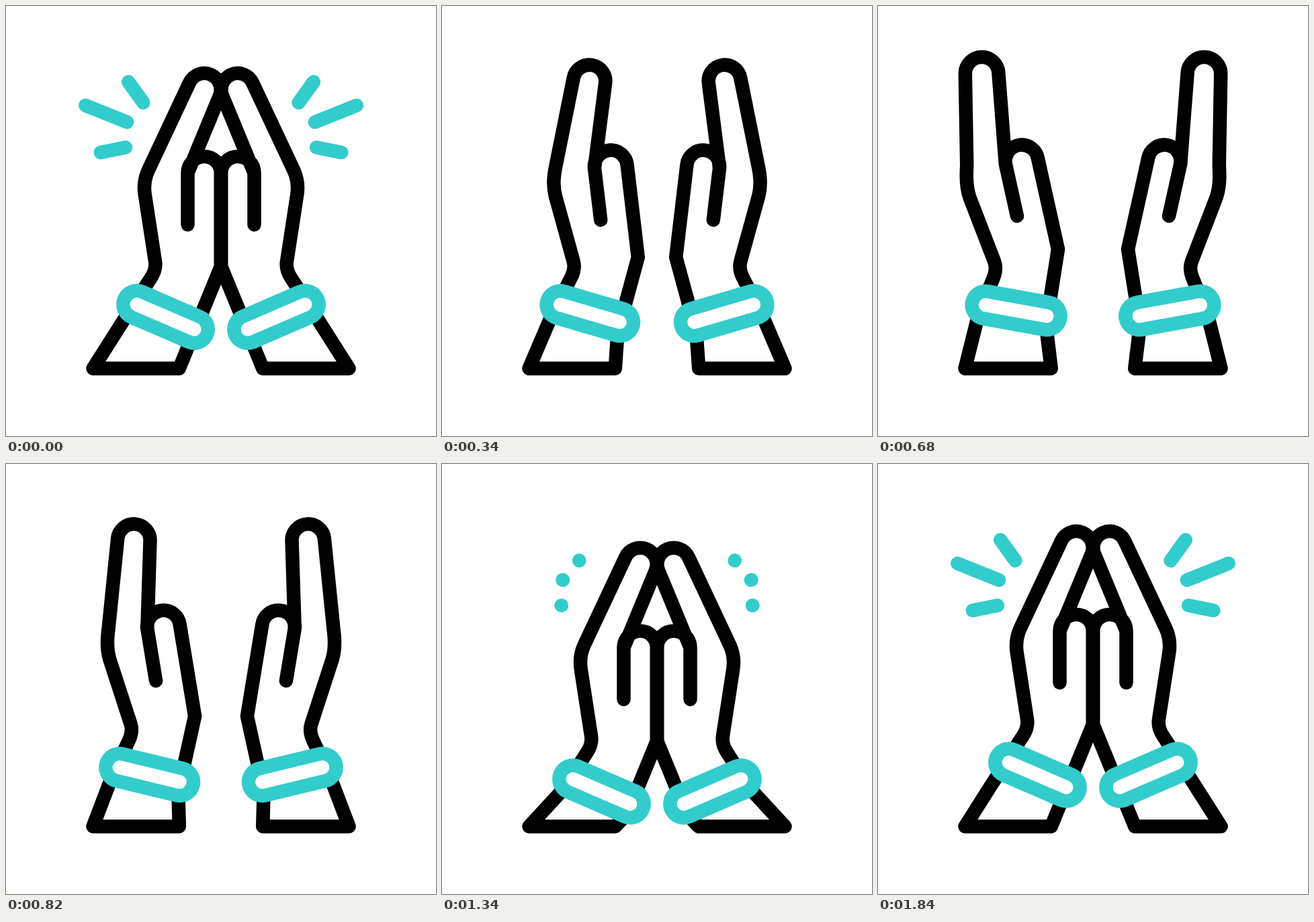
An HTML page for the animation above (2.4 s loop, 640 by 640 pixels).

```html
<!DOCTYPE html>
<html lang="en">
<head>
<meta charset="utf-8">
<title>Praying hands</title>
<style>
  html, body { margin: 0; width: 100%; height: 100%; overflow: hidden; background: #fff; }
  svg { display: block; width: 100vw; height: 100vh; }
</style>
</head>
<body>
<svg viewBox="0 0 640 640">
  <defs>
    <g id="half" fill="none" stroke="#000" stroke-width="20.5" stroke-linecap="round" stroke-linejoin="round">
      <path id="hand"/>
      <path id="cuff" stroke="#3cc" stroke-width="61.5"/>
      <path id="slot" stroke="#fff"/>
      <path id="rays" stroke="#3cc"/>
    </g>
  </defs>
  <use href="#half"/>
  <use href="#half" transform="translate(640 0) scale(-1 1)"/>
</svg>
<script>
const LOOP = 2400;
const OPEN = 1.145;  // how far the hands swing past the "apart" pose
const DROP = 28.5;

// Each joint of the left hand: x, y when closed, then x, y when apart.
const joints = {
  armLeft: [180, 460, 153, 460],
  wristA: [215.5, 405, 177.5, 403.5],
  wristBend: [224, 392.5, 182.8, 391],
  wristB: [222, 380, 179, 380],
  knuckleA: [206.8, 281, 144.8, 284],
  knuckleBend: [203.8, 262, 139, 266],
  knuckleB: [211.5, 245, 141.8, 239],
  tipLeft: [272.8, 114.6, 147, 103],
  tipRight: [317.5, 134.6, 196, 104],
  crotch: [270.5, 248.5, 199.5, 236.5],
  thumbBase: [270.5, 325.5, 214.6, 314],
  thumbRight: [319.75, 248.5, 247.8, 229.5],
  palm: [319.75, 388, 274.2, 365],
  armRight: [275.1, 497, 253, 478],
  cuffLeft: [194.8, 444.3, 164.3, 444.8],
  cuffRight: [280.2, 481.2, 254.7, 463.7]
};

// Inner end, then outer end.
const rays = [
  [180.1, 172.8, 118.3, 148],
  [204.4, 143.8, 182.2, 112.9],
  [177.9, 210.5, 140.8, 218]
];

const $ = id => document.getElementById(id);
const lerp = (a, b, k) => a + (b - a) * k;

function ease(t, start, end) {
  const u = Math.min(1, Math.max(0, (t - start) / (end - start)));
  return u * u * (3 - 2 * u);
}

// Semicircle over the segment from a to b.
function cap(a, b) {
  const r = Math.hypot(b[0] - a[0], b[1] - a[1]) / 2;
  return `A${r} ${r} 0 0 1 ${b}`;
}

function draw(t) {
  const open = OPEN * (ease(t, 10, 640) - ease(t, 655, 1150));
  const drop = DROP * (ease(t, 657, 1168) - ease(t, 1198, 1820));
  const p = {};
  for (const [name, [x0, y0, x1, y1]] of Object.entries(joints)) {
    p[name] = [lerp(x0, x1, open), lerp(y0, y1, open) + drop];
  }

  $('hand').setAttribute('d',
    `M129.5 539.5L${p.armLeft}L${p.wristA}Q${p.wristBend} ${p.wristB}` +
    `L${p.knuckleA}Q${p.knuckleBend} ${p.knuckleB}` +
    `L${p.tipLeft}${cap(p.tipLeft, p.tipRight)}L${p.crotch}L${p.thumbBase}` +
    `M${p.crotch}${cap(p.crotch, p.thumbRight)}L${p.palm}L${p.armRight}` +
    `L257.8 539.5L129.5 539.5L${p.armLeft}`);

  const band = `M${p.cuffLeft}L${p.cuffRight}`;
  $('cuff').setAttribute('d', band);
  $('slot').setAttribute('d', band);

  const reach = 1 - ease(t, 0, 320) + ease(t, 1320, 1640);
  $('rays').setAttribute('d', reach < 1e-4 ? '' : rays.map(([x0, y0, x1, y1]) =>
    `M${x0} ${y0}L${lerp(x0, x1, reach)} ${lerp(y0, y1, reach)}`).join(''));
}

const begin = performance.now();
function tick() {
  const t = (performance.now() - begin) % LOOP;
  draw(Math.floor(t / 20) * 20);
  requestAnimationFrame(tick);
}
tick();
</script>
</body>
</html>
```
